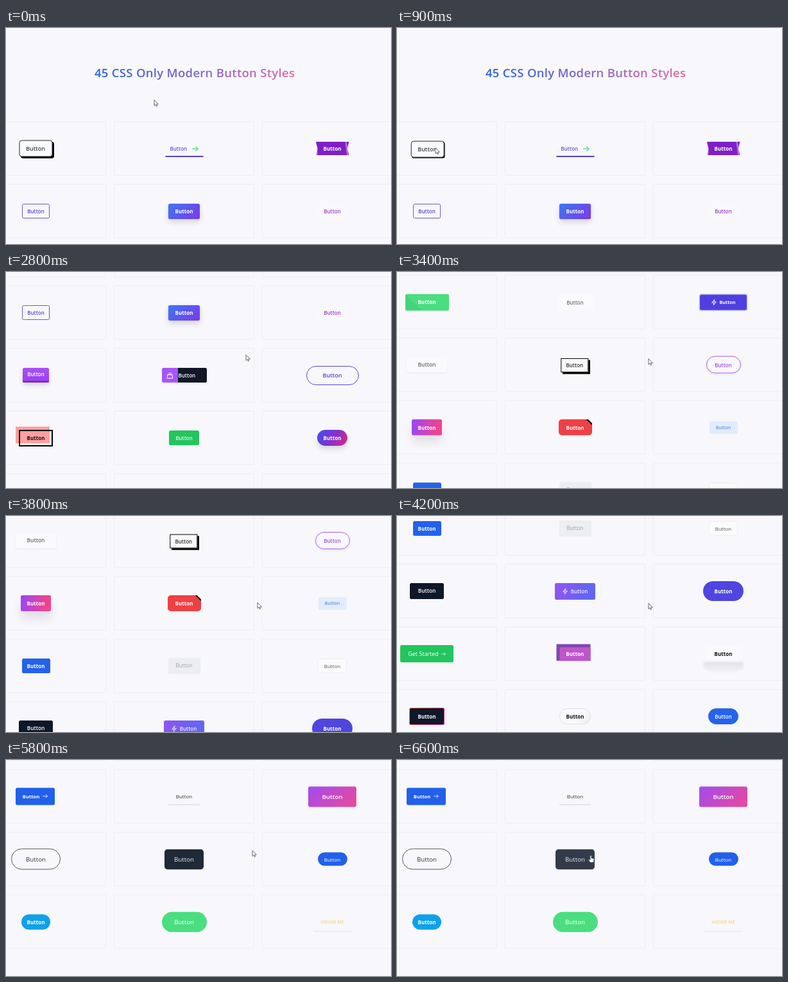
Recreate the animation shown at these times as an HTML page. Size 600 by 338 pixels, loop 6.7 s.

```html
<!DOCTYPE html>
<html lang="en">
<head>
<meta charset="utf-8">
<title>Button styles</title>
<style>
html, body { margin: 0; width: 100%; height: 100%; overflow: hidden; background: #f8f7fb; }
body { position: relative; font-family: "Open Sans", "Noto Sans", sans-serif; }
#page, #page *, #cursor, #cursor * { animation-duration: 6.7s; animation-iteration-count: infinite; animation-timing-function: step-end; }
#page { position: absolute; left: 0; top: 0; width: 600px; height: 1646px; animation-name: scroll; }
h1 {
  position: absolute; left: 138px; top: 56px; margin: 0; white-space: nowrap;
  font-size: 18.5px; line-height: 28px; font-weight: 600; letter-spacing: .3px; color: transparent;
  background: linear-gradient(90deg, #2563d8, #8467cb 52%, #e26aa8); -webkit-background-clip: text; background-clip: text;
}
#grid { position: absolute; left: -63px; top: 146px; display: grid; grid-template-columns: repeat(3, 219px); grid-auto-rows: 85px; gap: 13px 12px; }
#grid > div { box-sizing: border-box; border: 1px solid #efedf3; border-radius: 2px; display: flex; align-items: center; justify-content: center; }
button {
  all: unset; box-sizing: border-box; position: relative; isolation: isolate; flex: none;
  display: flex; align-items: center; justify-content: center; gap: 5px;
  border-radius: 2.5px; color: #fff; font-size: 8px; font-weight: 600; line-height: 1; white-space: nowrap;
}
button::before, button::after { position: absolute; box-sizing: border-box; }
.bold { font-weight: 700; }
.thin { font-weight: 400; }
.big { font-size: 9px; }
.huge { font-size: 9.7px; }
.pill { border-radius: 20px; }
svg { display: block; fill: none; stroke: currentColor; stroke-linecap: round; stroke-linejoin: round; overflow: visible; }

.press { border: 1.5px solid #20242c; border-radius: 4px; background: #f9fbfc; color: #3d434d; box-shadow: 2.5px 2.5px #000; animation-name: press; }
.fill { border-radius: 2px; overflow: hidden; }
.fill::before { content: ""; left: 0; right: 0; bottom: 0; height: 2px; background: #4f3fdc; z-index: -1; animation-name: rise; }
.fill span, .fill svg { position: absolute; }
.fill span { left: 8px; color: #6357d8; animation-name: label; }
.fill svg { left: 42px; color: #62dc98; animation-name: arrow; }
.ribbon { border-radius: 0; background: linear-gradient(83deg, #a95be0 3px, #7e1fc8 3.6px 47.5px, #b56be8 48px 50px, #7e1fc8 50.5px); clip-path: polygon(0 0, 100% 0, 95% 50%, 100% 100%, 2% 100%, 6% 50%); }
.offset { color: #111; }
.offset::before { content: ""; left: -5px; top: -5px; width: 53px; height: 26px; background: #ff9f9f; z-index: -1; }
.offset::after { content: ""; inset: 0; border: 2px solid #000; }
.bag { justify-content: flex-start; gap: 9px; padding-left: 8px; background: linear-gradient(90deg, #a855f7 25.5px, #0f1728 25.5px); }
.float::before { content: ""; left: -3px; right: -3px; top: 25px; height: 17px; border-radius: 2px 2px 50% 50%; background: linear-gradient(#e2e1e7, #f3f2f6); filter: blur(1.5px); z-index: -1; }
.rim { background: linear-gradient(#0f172a, #0f172a) padding-box, linear-gradient(120deg, #e8893c, #ee3f5c 45%, #d936b0) border-box; border: 1.5px solid transparent; }
.hover { border-radius: 5px; background: #1f2937; animation-name: lighten; }

#cursor { position: absolute; left: 0; top: 0; animation-name: move; }
#cursor svg { position: absolute; left: 0; top: 0; fill: #fff; stroke: #45444c; stroke-width: .8; }
#arrowShape { animation-name: arrowShown; }
#handShape { animation-name: handShown; }

@keyframes scroll {
  0% { transform: none; }
  38.80% { transform: translateY(-20px); }
  40.29% { transform: translateY(-110px); }
  41.79% { transform: translateY(-223px); }
  43.28% { transform: translateY(-320px); }
  44.77% { transform: translateY(-400px); }
  46.26% { transform: translateY(-460px); }
  47.76% { transform: translateY(-502px); }
  49.25% { transform: translateY(-525px); }
  50.74% { transform: translateY(-533.5px); }
  55.22% { transform: translateY(-565px); }
  56.71% { transform: translateY(-640px); }
  58.20% { transform: translateY(-730px); }
  59.70% { transform: translateY(-800px); }
  61.19% { transform: translateY(-840px); }
  62.68% { transform: translateY(-855px); }
  64.17% { transform: translateY(-856px); }
  77.61% { transform: translateY(-880px); }
  79.10% { transform: translateY(-935px); }
  80.59% { transform: translateY(-1013px); }
  82.08% { transform: translateY(-1160px); }
  83.58% { transform: translateY(-1275px); }
  85.07% { transform: translateY(-1300px); }
  86.56%, 100% { transform: translateY(-1307.5px); }
}
@keyframes move {
  0% { transform: translate(231px, 113px); animation-timing-function: steps(5); }
  7.46% { transform: translate(60px, 188px); }
  13.43% { transform: translate(60px, 188px); animation-timing-function: steps(3); }
  17.91% { transform: translate(265px, 190px); }
  20.89% { transform: translate(265px, 190px); animation-timing-function: steps(3); }
  25.37% { transform: translate(482px, 186px); animation-timing-function: steps(2); }
  28.35% { transform: translate(505px, 190px); }
  31.34% { transform: translate(505px, 190px); animation-timing-function: steps(5); }
  38.80% { transform: translate(374px, 130px); }
  41.79% { transform: translate(374px, 130px); animation-timing-function: steps(6); }
  50.74% { transform: translate(392px, 136px); }
  62.68% { transform: translate(392px, 137px); }
  74.62% { transform: translate(392px, 137px); animation-timing-function: steps(4); }
  80.59% { transform: translate(384px, 142px); }
  88.05% { transform: translate(384px, 142px); animation-timing-function: steps(5); }
  95.52%, 100% { transform: translate(302px, 149px); }
}
@keyframes arrowShown {
  0%, 10.44%, 20.89%, 31.34% { opacity: 1; }
  7.46%, 17.91%, 26.86%, 94.02%, 100% { opacity: 0; }
  13.43% { opacity: 1; }
}
@keyframes handShown {
  0%, 13.43%, 20.89%, 31.34% { opacity: 0; }
  7.46%, 10.44%, 17.91%, 26.86%, 94.02%, 100% { opacity: 1; }
}
@keyframes press {
  0%, 14.92%, 100% { transform: none; box-shadow: 2.5px 2.5px #000; }
  7.46% { transform: translate(1.2px, 1.2px); box-shadow: 1.2px 1.2px #000; }
  8.95% { transform: translate(2.5px, 2.5px); box-shadow: 0 0 #000; }
  13.43% { transform: translate(1.2px, 1.2px); box-shadow: 1.2px 1.2px #000; }
}
@keyframes rise {
  0%, 28.35%, 100% { height: 2px; }
  17.91% { height: 7px; }
  19.40% { height: 18px; }
  20.89% { height: 26px; }
  22.38% { height: 22px; }
  23.88% { height: 13px; }
  25.37% { height: 6px; }
  26.86% { height: 3px; }
}
@keyframes label {
  0%, 28.35%, 100% { transform: none; color: #6357d8; }
  17.91%, 25.37% { transform: translateX(2.3px); color: #a19ce4; }
  19.40%, 23.88% { transform: translateX(3.5px); color: #dcdaf8; }
  20.89% { transform: translateX(4px); color: #fff; }
  26.86% { transform: translateX(1px); color: #8078dc; }
}
@keyframes arrow {
  0%, 28.35%, 100% { transform: none; }
  17.91%, 25.37% { transform: translateX(4.3px); }
  19.40%, 23.88% { transform: translateX(5.5px); }
  20.89% { transform: translateX(6px); }
  26.86% { transform: translateX(2px); }
}
@keyframes lighten {
  0% { background: #1f2937; }
  94.02% { background: #2a3242; }
  95.52%, 100% { background: #333b4b; }
}
</style>
</head>
<body>
<svg width="0" height="0" style="position:absolute">
  <symbol id="arrow" viewBox="0 0 10 8"><path d="M.5 4H9.3M6 .7 9.3 4 6 7.3"/></symbol>
  <symbol id="bolt" viewBox="0 0 8 10"><path d="M4.8.6.7 5.7H4L3.3 9.4 7.4 4.3H4.1Z"/></symbol>
  <symbol id="bag" viewBox="0 0 9 10"><path d="M1 3.5H8L8.5 9.3H.5ZM2.8 4.5V2.4a1.7 1.7 0 0 1 3.4 0V4.5"/></symbol>
</svg>

<div id="page">
  <h1>45 CSS Only Modern Button Styles</h1>
  <div id="grid">
    <div><button class="press big" style="width:52px;height:26px;translate:-.5px -.5px">Button</button></div>
    <div><button class="fill" style="width:60px;height:26px"><span>Button</span><svg width="10" height="8" stroke-width="1.3"><use href="#arrow"/></svg></button></div>
    <div><button class="ribbon bold" style="width:52px;height:21px">Button</button></div>

    <div><button style="width:43px;height:23px;border:1.3px solid #6a5ad0;color:#5b4ac8">Button</button></div>
    <div><button class="bold" style="width:48.5px;height:24px;background:linear-gradient(135deg,#3b78f5,#7e37e8);box-shadow:0 0 2px #b9b4ea,0 5px 10px #0002">Button</button></div>
    <div><button style="width:48px;height:22px;background:#f9f8fc;color:#9b3fc8">Button</button></div>

    <div><button style="width:41px;height:23px;padding-bottom:3px;background:linear-gradient(#a951f7,#9b3df0);box-shadow:inset 0 -2.5px #7e22ce,0 4px 7px #0002">Button</button></div>
    <div><button class="bag" style="width:70px;height:23px"><svg width="9" height="10"><use href="#bag"/></svg><span>Button</span></button></div>
    <div><button class="pill big" style="width:82px;height:30px;border:1.4px solid #5a49d6;color:#5546c8">Button</button></div>

    <div><button class="offset bold" style="width:53px;height:26px">Button</button></div>
    <div><button style="width:46.5px;height:23.5px;background:#22c55e;color:#dcf8e6">Button</button></div>
    <div><button class="pill bold" style="width:47.5px;height:25.5px;background:linear-gradient(120deg,#5147e6 15%,#8132d4 50%,#dc2878);box-shadow:0 5px 8px #0002">Button</button></div>

    <div><button class="bold" style="width:68px;height:26px;background:linear-gradient(45deg,#43d479 18px,#4ade80 18.5px);font-size:8.2px">Button</button></div>
    <div><button style="width:56px;height:23px;background:#faf9fc;color:#737378">Button</button></div>
    <div><button class="bold" style="width:73px;height:24px;background:#4f3fe0;box-shadow:0 0 0 1.5px #c6c9f4;font-size:7.2px"><svg width="8" height="10"><use href="#bolt"/></svg>Button</button></div>

    <div><button style="width:63px;height:24px;background:#faf9fc;box-shadow:0 1px 2px #00000014;color:#666a70;font-size:8.4px">Button</button></div>
    <div><button style="width:43px;height:22px;border:1.3px solid #000;border-radius:0;background:#fafafc;box-shadow:2.7px 2.7px #000;color:#333;translate:-.7px .5px">Button</button></div>
    <div><button class="pill" style="width:54px;height:27px;border:1.5px solid #a65fd8;color:#9b55d4;box-shadow:0 2px 4px #0001">Button</button></div>

    <div><button class="bold" style="width:47px;height:25.5px;background:linear-gradient(100deg,#a046f0 10%,#ee4391 80%);box-shadow:0 11px 15px #00000018">Button</button></div>
    <div><button class="bold" style="width:52px;height:25.5px;border-radius:5px;background:linear-gradient(225deg,#f8f7fb 4.2px,#2a1a1c 4.5px 6.5px,#ef4044 7px)">Button</button></div>
    <div><button style="width:44px;height:20px;background:#e2ecfa;color:#5a92ee;font-size:7px">Button</button></div>

    <div><button class="bold" style="width:44px;height:22.5px;background:#2362eb">Button</button></div>
    <div><button class="thin" style="width:50px;height:25px;background:#eceef2;color:#9ca3af;font-size:8.2px">Button</button></div>
    <div><button class="thin" style="width:43px;height:21px;background:#fbfbfb;box-shadow:0 0 2px #0002;color:#55565c">Button</button></div>

    <div><button style="width:53px;height:25.5px;background:#0f172a;font-size:8.3px">Button</button></div>
    <div><button style="width:63.5px;height:26px;background:linear-gradient(110deg,#9353f2,#6366f1 75%);color:#eee9ff"><svg width="8" height="10"><use href="#bolt"/></svg>Button</button></div>
    <div><button class="pill bold" style="width:63px;height:30.5px;background:#4f46e0">Button</button></div>

    <div><button class="thin big" style="width:83.5px;height:27.5px;gap:4px;background:#22c55e">Get Started <svg width="7" height="6"><use href="#arrow"/></svg></button></div>
    <div><button class="bold" style="width:53px;height:26px;border-radius:0;padding:5px 0 0 4.5px;background:linear-gradient(#bf55cc,#bf55cc) 4.5px 5px no-repeat #7e47b0;translate:-2.5px -2.5px">Button</button></div>
    <div><button class="float bold" style="width:56px;height:25px;background:#faf9fd;color:#111">Button</button></div>

    <div><button class="rim bold" style="width:55px;height:27px">Button</button></div>
    <div><button class="pill bold" style="width:49px;height:25px;border:1px solid #dedee4;background:linear-gradient(115deg,#faf9fc 65%,#ededf1);color:#111">Button</button></div>
    <div><button class="pill" style="width:47.5px;height:25.5px;background:#2563eb">Button</button></div>

    <div><button class="thin" style="width:53px;height:27px;border-radius:0;background:linear-gradient(45deg,#8b30d5 6.2px,#faf9fd 6.8px);box-shadow:0 1px 1px #0001;color:#333">Button</button></div>
    <div><button class="thin" style="width:50px;height:26.5px;background:#faf9fd;box-shadow:2px 2px #7e22ce;color:#7e22ce;font-size:8.6px;translate:.3px .5px">Button</button></div>
    <div><button class="thin" style="width:68px;height:30px;background:#1c2636;font:7.2px 'Noto Sans Mono','DejaVu Sans Mono',monospace">Button</button></div>

    <div><button class="bold" style="width:61px;height:26.5px;background:#2160ea;font-size:7.6px;translate:-1px"><span>Button</span><svg width="8" height="6.4"><use href="#arrow"/></svg></button></div>
    <div><button class="thin" style="width:49px;height:27px;border-radius:0;border-bottom:1px solid #d5d4da;color:#333">Button</button></div>
    <div><button class="huge" style="width:75.5px;height:32px;border-radius:3px;background:linear-gradient(135deg,#a04cf0,#ec4899)">Button</button></div>

    <div><button class="pill huge thin" style="width:77px;height:33px;border:1.2px solid #55565c;color:#333">Button</button></div>
    <div><button class="hover huge thin" style="width:61.5px;height:32px;color:#e6eaf6">Button</button></div>
    <div><button class="pill thin" style="width:46px;height:21px;background:#2160ea">Button</button></div>

    <div><button class="pill bold" style="width:45px;height:24px;background:#0ea1e9">Button</button></div>
    <div><button class="pill huge thin" style="width:70px;height:32px;background:#4ade80">Button</button></div>
    <div><button class="bold" style="width:60px;height:31px;border-radius:0;border-bottom:1px solid #e3e1e6;color:#f0dc9a;font-size:7px">HOVER ME</button></div>
  </div>
</div>

<div id="cursor">
  <svg id="arrowShape" width="7" height="10"><path d="M0 0V8.5L2 6.7 3.4 9.6 4.7 9 3.4 6.2H6Z"/></svg>
  <svg id="handShape" width="9" height="12"><path d="M-1 1Q0-.8 1 1V4.4L4.4 5.2Q5.4 5.6 5.1 7L4.2 11.3H-.8L-3.6 7.4Q-3.4 5.8-1 7.2Z"/></svg>
</div>
</body>
</html>
```
